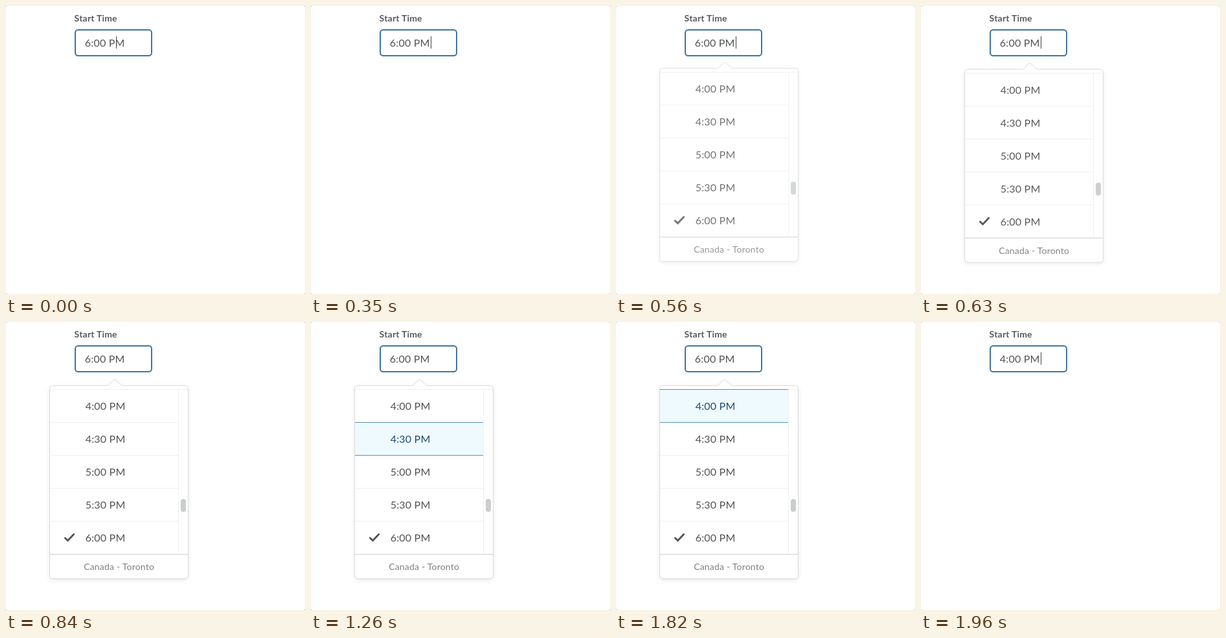
An HTML page for the animation above (2.45 s loop, 462 by 446 pixels).

```html
<!DOCTYPE html>
<html lang="en">
<head>
<meta charset="utf-8">
<title>Start time picker</title>
<style>
  html, body { margin: 0; height: 100%; overflow: hidden; background: #999; }
  svg { display: block; width: 462px; height: 446px; background: #fff; border-radius: 2px; }
  text { font: 16px Lato, sans-serif; letter-spacing: .2px; fill: #505355; white-space: pre; }
  .label { font-size: 14px; font-weight: 700; fill: #565a5c; }
  .zone { font-size: 14px; fill: #7c8083; text-anchor: middle; }
  .field { fill: #fff; stroke: #40769f; stroke-width: 2; }
  .card { fill: #fff; stroke: #d9dbdd; filter: drop-shadow(0 2px 3px rgba(0, 0, 0, .09)); }
  .rule { fill: #eeeff0; }
  .row rect { fill: none; }
  .row.hover rect { fill: #eefafd; stroke: #5a91b0; stroke-dasharray: 198 51; }
  .row.hover text { fill: #244a6e; }
  .check { fill: none; stroke: #505355; stroke-width: 2.8; stroke-linecap: round; }
</style>
</head>
<body>
<svg viewBox="0 0 462 446">
  <text class="label" x="105.6" y="24">Start Time</text>
  <rect class="field" x="107" y="37" width="118" height="40" rx="4.5"/>
  <text id="value" x="121.8" y="63"></text>
  <rect id="caret" y="47" width="1" height="19" fill="#444"/>
  <g id="menu">
    <path class="card" d="M72.5 98.5H157.5L168 88.5L178.5 98.5H276.5a5 5 0 0 1 5 5V392.5a5 5 0 0 1-5 5H72.5a5 5 0 0 1-5-5V103.5a5 5 0 0 1 5-5Z"/>
    <rect class="rule" x="68" y="104" width="213" height="1"/>
    <rect class="rule" x="266" y="104" width="1" height="256"/>
    <rect x="270" y="274" width="8" height="20" rx="4" fill="#cbcccd"/>
    <g id="rows"></g>
    <path class="check" d="M91.3 334.4L95.5 338.5L104.7 328.7"/>
    <rect x="68" y="359" width="213" height="1.5" fill="#d9dbdd"/>
    <text class="zone" x="174.6" y="384">Canada - Toronto</text>
  </g>
</svg>
<script>
const LOOP = 2450, TICK = 70;
const OPEN = 490, CLOSE = 1960, FADE_START = 410, FADE = 300;
const ROW_TOP = 104, ROW_HEIGHT = 51;
const times = ["4:00 PM", "4:30 PM", "5:00 PM", "5:30 PM", "6:00 PM"];
const [value, caret, menu, rows] =
  ["value", "caret", "menu", "rows"].map(id => document.getElementById(id));

// Rules go below all rows so that a highlighted row keeps both its edges
const rowTops = times.map((_, i) => ROW_TOP + ROW_HEIGHT * i);
rows.innerHTML =
  rowTops.slice(1).map(y => `<rect class="rule" x="68" y="${y}" width="198" height="1"/>`).join("") +
  rowTops.map((y, i) => `<g class="row">
    <rect x="68" y="${y + .5}" width="198" height="${ROW_HEIGHT}"/>
    <text x="122.7" y="${y + 32}">${times[i]}</text></g>`).join("");
const items = rows.querySelectorAll(".row");

// CSS "ease": cubic-bezier(.25, .1, .25, 1), solved by bisection
function ease(x) {
  if (x <= 0 || x >= 1) return x <= 0 ? 0 : 1;
  const bezier = (a, b, s) => 3 * a * s * (1 - s) ** 2 + 3 * b * s * s * (1 - s) + s ** 3;
  let low = 0, high = 1;
  for (let i = 0; i < 20; i++) {
    const mid = (low + high) / 2;
    if (bezier(.25, .25, mid) < x) low = mid; else high = mid;
  }
  return bezier(.1, 1, low);
}

function draw(now) {
  const elapsed = now % LOOP;
  const t = Math.floor(elapsed / TICK) * TICK;
  const within = (from, to) => t >= from && t < to;

  value.textContent = t < CLOSE ? times[4] : times[0];
  caret.setAttribute("x", t < 210 ? 170 : 185);
  const caretOff = within(210, 350) || within(840, 1400) || within(1820, CLOSE);
  caret.style.display = caretOff ? "none" : "";

  const shown = ease((t - FADE_START) / FADE);
  menu.style.display = within(OPEN, CLOSE) ? "" : "none";
  menu.style.opacity = shown;
  menu.setAttribute("transform", `translate(0 ${-10 * (1 - shown)})`);

  const hovered = within(1260, 1540) ? 1 : within(1540, CLOSE) ? 0 : -1;
  items.forEach((item, i) => item.classList.toggle("hover", i === hovered));
}

const start = performance.now();
function loop() {
  draw(performance.now() - start);
  requestAnimationFrame(loop);
}
loop();
</script>
</body>
</html>
```
